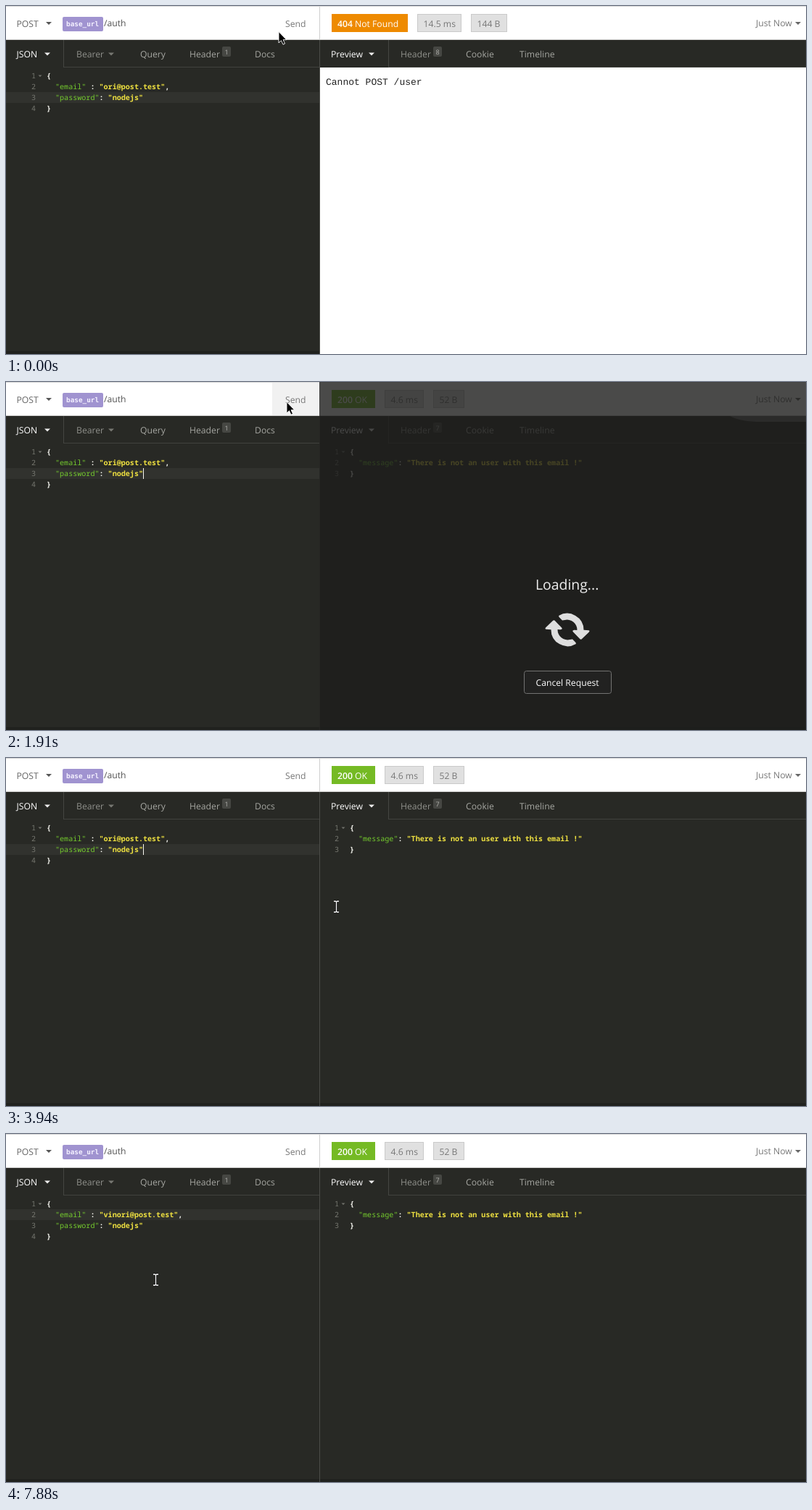
An HTML page for the animation above (8 s loop, 1103x481 px).

```html
<!DOCTYPE html>
<html lang="en">
<head>
<meta charset="utf-8">
<title>API client</title>
<style>
html, body { margin: 0; width: 100%; height: 100%; overflow: hidden; background: #282925; }
svg { display: block; width: 1103px; height: 481px; }
text { font: 12.2px "Open Sans", sans-serif; white-space: pre; text-rendering: geometricPrecision; }
.code { font: 600 10.08px "Noto Sans Mono", monospace; fill: #f8f8f2; }
.num { fill: #75766f; font-weight: 400; text-anchor: end; }
.key { fill: #75cc2e; font-weight: 500; }
.str { fill: #eee040; }
.plain { font: 13px "Liberation Mono", monospace; fill: #222; }
.chip { font: bold 9.35px "DejaVu Sans Mono", monospace; fill: #f4f1ff; }
.small { font-size: 9px; text-anchor: middle; }
.big { font-size: 19.4px; }
.medium { font-weight: 500; }
.bold { font-weight: 600; }
</style>
</head>
<body>
<svg id="stage" viewBox="0 0 1103 481"></svg>
<script>
const LOOP = 8000, ADVANCE = 6.05;
const SEND = 1510, RESPONSE = 1780, LOADED = 2310, CLICK = 5540;
const typingTimes = [6920, 7100, 7290];
const blinkTimes = [420, 960, 1510, 2180, 2560, 3100, 3670, 4190, 4750, 5290, 5540, 6110, 6640, 7880];
const spinTimes = [1510, 1630, 1780, 1930, 2060, 2180];
// time, x, y of the mouse pointer
const pointerPath = [
  [0, 376, 35], [120, 380, 32], [270, 385, 29], [420, 387, 27],
  [2180, 392, 28], [2310, 440, 42], [2440, 500, 63], [2560, 565, 125], [2710, 608, 173],
  [2860, 650, 180], [3000, 679, 178], [3240, 655, 175], [3400, 634, 174], [3550, 625, 174],
  [3670, 610, 195], [3800, 560, 217], [3930, 455, 205], [4060, 345, 175], [4190, 255, 145],
  [4350, 185, 120], [4630, 146, 109], [4870, 141, 106], [5010, 136, 111], [5290, 134, 117],
  [5840, 160, 150], [5970, 195, 188], [6110, 206, 201]
];

const rect = (x, y, w, h, fill, more = "") =>
  `<rect x="${x}" y="${y}" width="${w}" height="${h}" fill="${fill}" ${more}/>`;
const text = (x, y, str, fill, cls = "") =>
  `<text x="${x}" y="${y}" fill="${fill}" class="${cls}">${str}</text>`;
const arrow = (x, y, fill, r = 4) => `<path d="M${x - r} ${y}h${2 * r}l${-r} ${r}z" fill="${fill}"/>`;
const span = (cls, str) => `<tspan class="${cls}">${str}</tspan>`;
const baseline = n => 85 + 15 * n;
const code = (x, n, str, id = "") =>
  `<text id="${id}" x="${x}" y="${baseline(n)}" class="code">${str}</text>`;
const gutter = (x, count) => Array.from({ length: count }, (_, i) =>
  `<text x="${x}" y="${baseline(i + 1)}" class="code num">${i + 1}</text>`).join("") + arrow(x + 6, 95.5, "#73746e", 2.5);
const counter = (x, n) => rect(x, 56, 12, 14, "#464743", 'rx="2"') + text(x + 6, 66.5, n, "#b4b4b0", "small");
const status = (w, fill, value, label) =>
  rect(449, 11, w, 25, fill) + text(457, 28.5, `${span("bold", value)} ${label}`, "#fff");
const tag = (x, w, str) =>
  rect(x + .5, 11.5, w - 1, 24, "#e0e0e0", 'stroke="#cacaca"') + text(x + 8.5, 28.5, str, "#777");
const emailLine = name => `${span("key", '"email"')} : ${span("str", `"${name}@post.test"`)},`;

const requestPane =
  rect(0, 0, 1103, 46, "#fff") + rect(0, 0, 1103, 1, "#d9d9d9") + rect(0, 46, 1103, 1, "#cfcfcd") +
  rect(367, 1, 65, 45, "#f1f1f1", 'id="hover"') +
  text(14.5, 28.5, "POST", "#666") + arrow(59, 22, "#555") +
  rect(78, 15, 56, 20, "#a093d0", 'rx="2"') + text(83, 28, "base_url", "#fff", "chip") +
  text(135, 28, "/auth", "#555") + text(385, 28.5, "Send", "#777") +
  rect(79, 47, 1, 38, "#454642") + rect(80, 84, 352, 1, "#41423e") +
  text(14.5, 71, "JSON", "#fff", "medium") + arrow(57, 64.5, "#eee") +
  text(97, 71, "Bearer", "#8f908b") + arrow(145, 64.5, "#777873") +
  text(185, 71, "Query", "#a5a6a1") + text(253, 71, "Header", "#a5a6a1") + counter(298, 1) +
  text(343, 71, "Docs", "#a5a6a1") +
  rect(0, 119, 432, 15, "#31322e", 'id="active"') + gutter(41, 4) +
  code(56, 1, "{") + code(68, 2, "", "email") +
  code(68, 3, `${span("key", '"password"')}: ${span("str", '"nodejs"')}`) + code(56, 4, "}") +
  rect(189, 119, 1, 15, "#f8f8f2", 'id="caret"');

const responsePane =
  rect(433, 84, 670, 1, "#41423e") + rect(433, 84, 94, 1, "#282925") + rect(527, 47, 1, 38, "#454642") +
  text(448, 71, "Preview", "#fff", "medium") + arrow(504, 64.5, "#eee") +
  text(544, 71, "Header", "#8f908b") + text(634, 71, "Cookie", "#a5a6a1") + text(708, 71, "Timeline", "#a5a6a1") +
  text(1034, 28, "Just Now", "#777") + arrow(1092, 22, "#666") +
  rect(0, 477, 1103, 4, "#20211e");

const before = `<g id="before">${rect(433, 85, 670, 396, "#fff")}
  ${status(105, "#ee8a00", 404, "Not Found")}${tag(567, 61, "14.5 ms")}${tag(641, 50, "144 B")}
  ${counter(589, 8)}${text(441, 109, "Cannot POST /user", "#222", "plain")}</g>`;

const after = `<g id="after">${status(60, "#75ba24", 200, "OK")}${tag(522, 54, "4.6 ms")}${tag(589, 43, "52 B")}
  ${counter(589, 7)}${gutter(459, 3)}${code(474, 1, "{")}
  ${code(486, 2, `${span("key", '"message"')}: ${span("str", '"There is not an user with this email !"')}`)}
  ${code(474, 3, "}")}</g>`;

const half = "M-23.5-5A24 24 0 0 1 16.5-17L22-22Q24-23 24-20V-6Q24-4 22-4H8Q5-4 7-7L10-10A14.5 14.5 0 0 0-13-7L-15-4H-22Z";
const loading = `<g id="loading">${rect(432, 0, 671, 481, "#1d1d1c", 'opacity=".8"')}
  <path d="M998 47Q1012 55 1042 55H1103V47Z" fill="#2b2b2a"/>
  ${text(730, 287, "Loading...", "#eee", "big")}
  <g id="spinner" fill="#dedede"><path d="${half}"/><path d="${half}" transform="rotate(180)"/></g>
  ${rect(714.5, 399.5, 120, 31, "#222221", 'rx="3" stroke="#737372"')}
  ${text(730.5, 420, "Cancel Request", "#fff")}</g>`;

const beam = "M-3.5-7.5H-1L0-6.5L1-7.5H3.5M0-6.5V6.5M-3.5 7.5H-1L0 6.5L1 7.5H3.5";
const pointers = `<path id="mouse" d="M0 .5V16L3.5 12.7L6 18.2L8.5 17L6.1 11.7H10.8Z" fill="#000" stroke="#fff" stroke-width=".9"/>
  <g id="beam" fill="none"><path d="${beam}" stroke="#111" stroke-width="3"/><path d="${beam}" stroke="#fff" stroke-width="1.3"/></g>`;

const $ = id => document.getElementById(id);
$("stage").innerHTML = requestPane + responsePane + before + after +
  rect(432, 1, 1, 45, "#cfcfcf") + rect(432, 47, 1, 434, "#4b4c48") + loading + pointers;

const show = (id, on) => $(id).setAttribute("display", on ? "inline" : "none");
const countPassed = (times, t) => times.filter(time => time <= t).length;

function draw(t) {
  show("hover", t >= 270 && t < LOADED);
  show("before", t < RESPONSE);
  show("after", t >= RESPONSE);
  show("loading", t >= SEND && t < LOADED);
  const spinTime = spinTimes[Math.max(0, countPassed(spinTimes, t) - 1)];
  $("spinner").setAttribute("transform", `translate(774 342.5) rotate(${(spinTime - SEND) * .18 - 2}) scale(.95)`);

  const typed = countPassed(typingTimes, t), clicked = t >= CLICK;
  $("email").innerHTML = emailLine("vin".slice(0, typed) + "ori");
  $("active").setAttribute("y", clicked ? 104 : 119);
  $("caret").setAttribute("x", clicked ? Math.round(135 + typed * ADVANCE) : 189);
  $("caret").setAttribute("y", clicked ? 104 : 119);
  show("caret", countPassed(blinkTimes, t) % 2 === 1);

  const [, x, y] = pointerPath.findLast(p => p[0] <= t);
  const overText = y > 85, offset = overText ? .5 : 0;
  show("mouse", !overText);
  show("beam", overText);
  $(overText ? "beam" : "mouse").setAttribute("transform", `translate(${x + offset} ${y + offset})`);
}

function tick() {
  draw(performance.now() % LOOP);
  requestAnimationFrame(tick);
}
tick();
</script>
</body>
</html>
```
